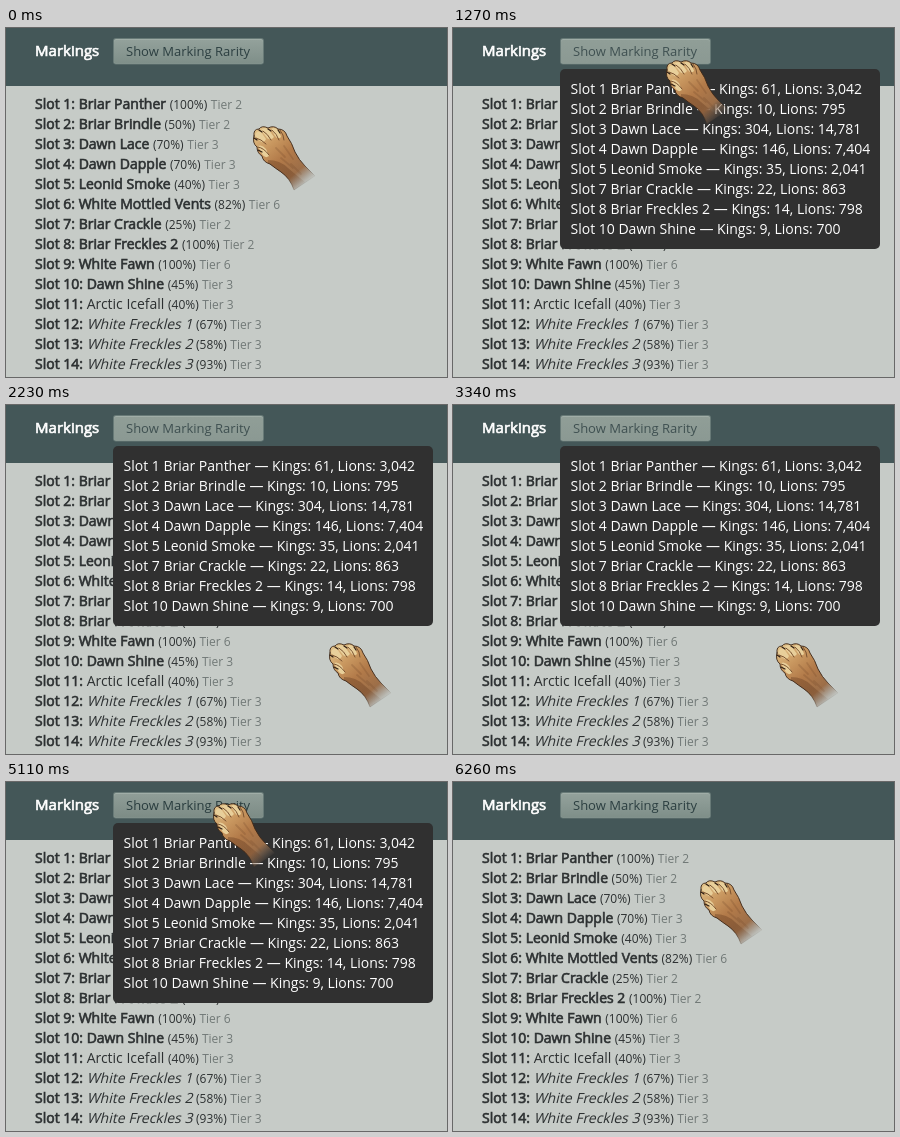
Animation, 441 px wide and 349 px high, one loop 6.38 s. Source, as an HTML page with a canvas:

```html
<!DOCTYPE html>
<html lang="en">
<head>
<meta charset="utf-8">
<title>Marking rarity</title>
<style>
  html, body { margin: 0; width: 100%; height: 100%; overflow: hidden; background: #c6cbc7; }
  canvas { display: block; }
</style>
</head>
<body>
<canvas id="stage" width="441" height="349"></canvas>
<script>
const ctx = document.getElementById('stage').getContext('2d');
const LOOP = 6380;
const FAMILY = '"Open Sans", "Noto Sans", sans-serif';
const INK = '#2c3031';

const markings = [
  ['Briar Panther', 100, 2], ['Briar Brindle', 50, 2], ['Dawn Lace', 70, 3],
  ['Dawn Dapple', 70, 3], ['Leonid Smoke', 40, 3], ['White Mottled Vents', 82, 6],
  ['Briar Crackle', 25, 2], ['Briar Freckles 2', 100, 2], ['White Fawn', 100, 6],
  ['Dawn Shine', 45, 3], ['Arctic Icefall', 40, 3], ['White Freckles 1', 67, 3],
  ['White Freckles 2', 58, 3], ['White Freckles 3', 93, 3]
];

// Slot number, kings, lions
const rarity = [
  [1, '61', '3,042'], [2, '10', '795'], [3, '304', '14,781'], [4, '146', '7,404'],
  [5, '35', '2,041'], [7, '22', '863'], [8, '14', '798'], [10, '9', '700']
];

// Draws text and returns the x where it ends; bold and slant are synthetic.
function text(str, x, y, size, color, style = '') {
  ctx.save();
  ctx.font = `400 ${size}px ${FAMILY}`;
  ctx.fillStyle = ctx.strokeStyle = color;
  ctx.translate(x, y);
  if (style === 'italic') ctx.transform(1, 0, -0.25, 1, 0, 0);
  ctx.fillText(str, 0, 0);
  if (style === 'bold') {
    ctx.lineWidth = size / 22;
    ctx.strokeText(str, 0, 0);
  }
  const end = x + ctx.measureText(str).width;
  ctx.restore();
  return end;
}

function box(x, y, w, h, r, fill) {
  ctx.beginPath();
  ctx.roundRect(x, y, w, h, r);
  ctx.fillStyle = fill;
  ctx.fill();
}

function linear(x0, y0, x1, y1, stops) {
  const g = ctx.createLinearGradient(x0, y0, x1, y1);
  stops.forEach(([at, color]) => g.addColorStop(at, color));
  return g;
}

const buttonLooks = {
  normal: ['#93a19b', '#7f8f89', '#2c3f41'],
  hover: ['#8f9d97', '#7d8c86', '#293c3e'],
  dim: ['#909e97', '#8b9993', '#3f5051']
};

function drawButton(look) {
  const [top, bottom, ink] = buttonLooks[look];
  box(107, 10, 151, 26.5, 3, '#687a77');
  box(108, 11, 149, 24.5, 2, '#a0ada7');
  box(108, 12, 149, 23.5, 2, linear(0, 12, 0, 35, [[0, top], [1, bottom]]));
  text('Show Marking Rarity', 120, 28, 13, ink);
}

function drawPage(look) {
  ctx.fillStyle = '#c6cbc7';
  ctx.fillRect(0, 0, 441, 349);
  ctx.fillStyle = '#445758';
  ctx.fillRect(0, 0, 441, 58);
  text('Markings', 29, 28, 15, '#ffffff', 'bold');
  drawButton(look);
  markings.forEach(([name, percent, tier], i) => {
    const y = 81 + i * 20;
    const style = i < 10 ? 'bold' : i > 10 ? 'italic' : '';
    let x = text(`Slot ${i + 1}: `, 29, y, 14, INK, 'bold');
    x = text(name + ' ', x, y, 14, INK, style);
    x = text(`(${percent}%)`, x, y, 12, INK) + 3.6;
    text(`Tier ${tier}`, x, y, 12, '#717977');
  });
}

function drawTooltip() {
  box(107, 41, 320, 180, 5, '#303030');
  rarity.forEach(([slot, kings, lions], i) => {
    const name = markings[slot - 1][0];
    text(`Slot ${slot} ${name} — Kings: ${kings}, Lions: ${lions}`, 117.5, 66 + i * 20, 14, '#ffffff');
  });
}

// Paw shapes, each with its top left corner at 0,0
const paws = {
  rest: {
    body: 'M1 10Q0 3 6 3Q9-1 15 2Q21-1 25 3Q32 3 34 10Q39 17 42 26Q46 34 52 40L62 50L41 64Q37 52 28 46Q22 42 17 38Q10 36 9 30Q4 27 4 21Q-1 17 1 10Z',
    toes: 'M2 10Q3 4 8 6L13 13Q11 18 7 15ZM8 4Q12 0 16 4L21 11Q18 15 14 12ZM18 3Q22 0 26 5L28 11Q25 14 22 10ZM5 20Q9 18 13 23L16 30Q12 33 9 28Z',
    lines: 'M3 12Q8 13 13 18M10 5Q15 8 18 14M19 4Q24 8 26 14M5 21Q11 22 16 29M27 4Q31 9 31 14',
    claws: 'M1 12L4 14M6 4L9 6M15 3L18 5M25 4L27 7M5 24L9 26',
    shade: 'M15 34Q27 34 35 42Q43 49 52 56L41 64Q37 52 28 46Q22 42 15 37Z',
    fur: 'M23 22L32 31M31 20L40 33M28 32L40 42M38 38L48 48',
    axis: [6, 4, 53, 59]
  },
  press: {
    body: 'M0 8Q1 3 8 6Q15 7 20 3Q27-1 35 2Q43 3 48 11Q53 19 60 28L76 42L61 56Q51 46 43 34Q38 32 34 28Q28 29 25 25Q19 26 18 20Q11 20 12 14Q4 14 0 8Z',
    toes: 'M1 8Q3 4 9 7L22 9Q24 13 18 14Q7 14 1 8ZM13 15Q17 13 26 16Q23 21 16 19ZM19 21Q25 18 31 22Q28 26 22 25Z',
    lines: 'M12 14Q21 15 26 11M18 20Q25 20 30 15M25 25Q32 25 36 19M9 7Q17 9 23 7',
    claws: 'M0 9L4 11M12 17L16 19M18 23L22 25M26 26L30 27',
    shade: 'M31 26Q40 23 46 30Q54 41 68 49L61 56Q51 46 43 34Z',
    fur: 'M32 9L42 18M38 8L50 22M40 20L52 34M48 24L60 36M52 36L62 45',
    axis: [8, 4, 70, 51]
  }
};
for (const paw of Object.values(paws)) {
  for (const part of ['body', 'toes', 'lines', 'claws', 'shade', 'fur']) paw[part] = new Path2D(paw[part]);
}

function drawPaw(pose, x, y) {
  const p = paws[pose];
  const fade = (rgb, a = 1) => linear(...p.axis, [
    [0, `rgba(${rgb},${a})`], [0.72, `rgba(${rgb},${a})`], [1, `rgba(${rgb},0)`]
  ]);
  const line = (path, color, width) => {
    ctx.strokeStyle = color;
    ctx.lineWidth = width;
    ctx.stroke(path);
  };
  ctx.save();
  ctx.translate(x, y);
  ctx.lineCap = ctx.lineJoin = 'round';
  ctx.fillStyle = linear(...p.axis, [
    [0, '#dfbd84'], [0.25, '#c99860'], [0.5, '#b27a49'],
    [0.78, '#9c6e48'], [1, 'rgba(130,115,102,0)']
  ]);
  ctx.fill(p.body);
  ctx.fillStyle = fade('104,62,34', 0.4);
  ctx.fill(p.shade);
  ctx.fillStyle = pose === 'rest' ? '#e8cf9a' : '#d9ad70';
  ctx.fill(p.toes);
  line(p.fur, fade('105,64,35', 0.22), 1.8);
  line(p.lines, '#7a5230', 1);
  line(p.body, fade('58,37,22', 0.9), 1);
  line(p.claws, '#2c1d12', 1.2);
  ctx.restore();
}

// The paw goes out in these steps and returns the same way.
const travelTimes = [810, 1270, 1390, 1510, 1660, 1810, 1960, 2080];
const travel = travelTimes.map((time, i) => {
  const k = (1 - Math.cos(Math.PI * i / (travelTimes.length - 1))) / 2;
  return [time, 'rest', 207 + 116 * k, 21 + 215 * k];
});
const keys = [
  [0, 'rest', 247, 98], [120, 'rest', 227, 69], [270, 'rest', 209, 25],
  [420, 'rest', 207, 22], [540, 'press', 207, 27],
  ...travel,
  [2230, 'rest', 323, 238], [3040, 'rest', 325, 241]
];

function draw(t) {
  const s = t < LOOP / 2 ? t : LOOP - t - 0.001;
  drawPage(s < 540 ? 'normal' : s < 1270 ? 'hover' : 'dim');
  if (s >= 810) drawTooltip();
  const [, pose, x, y] = keys.findLast(key => key[0] <= s);
  drawPaw(pose, Math.round(x), Math.round(y));
}

function tick() {
  draw(performance.now() % LOOP);
  requestAnimationFrame(tick);
}
tick();
</script>
</body>
</html>
```
